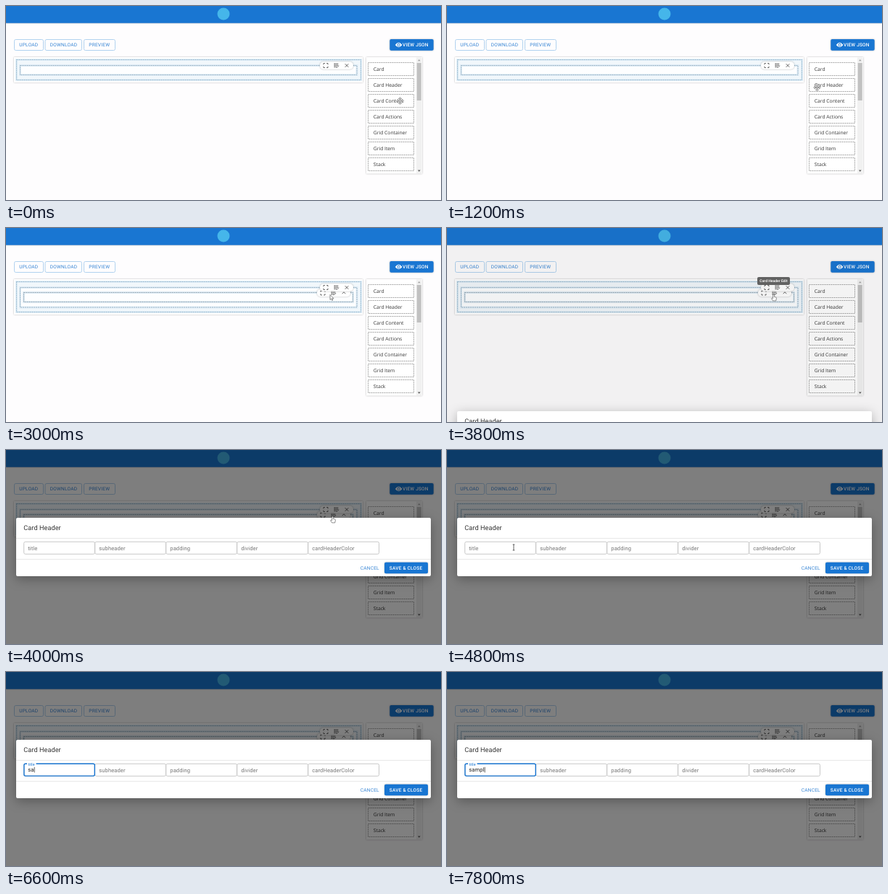
Animation of 600 by 269 pixels, one loop 8 s. Source, as an HTML page:

```html
<!DOCTYPE html>
<html lang="en">
<head>
<meta charset="utf-8">
<title>Card builder</title>
<style>
  html, body { margin: 0; width: 100%; height: 100%; overflow: hidden; background: #fefdfe; }
  svg { display: block; width: 100vw; height: 100vh; }
  text { font-family: Roboto, sans-serif; text-rendering: geometricPrecision; white-space: pre; }
  .btn { font-size: 6.55px; letter-spacing: .22px; }
  .btn.white { font-weight: 500; letter-spacing: .19px; }
  .item { font: 6.75px "Open Sans", "Noto Sans", sans-serif; fill: #363636; }
  .field { font-size: 7.6px; letter-spacing: .07px; fill: #777; }
  .blue { fill: #1976d2; }
  .btn.blue { fill: #3584d4; }
  .white { fill: #fff; }
  .dash { stroke-dasharray: 2 1; stroke-width: .8; }
  .shadow { filter: drop-shadow(0 .7px .8px rgba(0, 0, 0, .28)); }
  .deep { filter: drop-shadow(0 4px 8px rgba(0, 0, 0, .3)); }
</style>
</head>
<body>
<svg id="stage" viewBox="0 0 600 269" preserveAspectRatio="none"></svg>
<script>
const LOOP = 8000, STEP = 200;
const stage = document.getElementById('stage');
const $ = id => document.getElementById(id);

const rect = (x, y, w, h, attrs = '') =>
  `<rect x="${x}" y="${y}" width="${w}" height="${h}" ${attrs}/>`;
const text = (x, y, cls, str, attrs = '') =>
  `<text x="${x}" y="${y}" class="${cls}" ${attrs}>${str}</text>`;
const group = (id, body, attrs = '') => `<g id="${id}" ${attrs}>${body}</g>`;
const dashed = (x, y, w, h, color) =>
  rect(x, y, w, h, `class="dash" stroke="${color}" fill="none"`);

// Dashed drop area with a soft blue edge
const zone = (x, y, w, h, color, fill) =>
  rect(x, y, w, h, `fill="${fill}" stroke="#dfedf7" stroke-width="3"`) + dashed(x, y, w, h, color);

const outlined = (x, w, label) =>
  rect(x + .5, 46.5, w, 15, 'rx="2" fill="none" stroke="#a9cdee" stroke-width=".9"') +
  text(x + 7.3, 56.3, 'btn blue', label);

const filled = (x, y, w, h) => rect(x, y, w, h, 'rx="2" class="blue shadow"');

// Toolbar: expand, edit grid and close (or collapse) icons
function toolbar(x, y, last) {
  const corners = 'M-3-1.2V-3H-1.2M1.2-3H3V-1.2M3 1.2V3H1.2M-1.2 3H-3V1.2';
  let dots = '';
  for (let i = 0; i < 3; i++)
    for (let j = 0; j < 3 - (i > 1); j++) dots += rect(i * 2.1 - 3, j * 2.1 - 3, 1.4, 1.4);
  return `<g transform="translate(${x} ${y})">` +
    rect(-8, -5.2, 46, 10.4, 'rx="5" class="white shadow"') +
    `<g fill="none" stroke="#4a4a4a" stroke-width=".85">
      <path d="${corners}"/><path d="${last}" transform="translate(29 0)"/>
      <path d="M15 3.2L18 .2"/></g>
    <g fill="#5a5a5a" transform="translate(14.5 0)">${dots}</g></g>`;
}
const CLOSE = 'M-2.3-2.3L2.3 2.3M2.3-2.3L-2.3 2.3';
const CHEVRON = 'M-2.3 1.2L0-1.2L2.3 1.2';

const frame = (height, inner) =>
  rect(11, 71, 481, height, 'class="white shadow"') +
  zone(14.5, 74.5, 475, height - 7, '#8fb0c6', '#f1f7fb') +
  zone(19.5, 82.5, 464.5, inner, '#8ea6b6', '#fdfeff');

const idle = frame(35, 13) + toolbar(441, 82.5, CLOSE);

const dropZone = frame(46, 24) + rect(22, 85, 459, 18.5, 'fill="#b9d9f7"') +
  text(23.8, 96.8, 'item', 'Release to drop') + toolbar(441, 82.5, CLOSE);

const nested = frame(49, 27.5) + rect(24, 89, 455, 14, 'class="white shadow"') +
  zone(24.5, 89.5, 454, 13, '#8a979f', '#fdfeff') +
  toolbar(437, 90, CHEVRON) + toolbar(441, 82.5, CLOSE);

const names = ['Card', 'Card Header', 'Card Content', 'Card Actions', 'Grid Container', 'Grid Item', 'Stack'];
const list = names.map((name, i) => group('item' + i,
  dashed(499.5, 78.5 + i * 22, 63, 18, '#8f8f8f') + text(506.8, 90.1 + i * 22, 'item', name))).join('');

const side = rect(497, 71, 77, 161.5, 'class="white shadow"') + list +
  rect(566, 71.5, 7.5, 160.5, 'fill="#f1f1f1"') + rect(566.7, 79, 6, 52, 'fill="#c1c1c1"') +
  '<path d="M568 76.2h3.6l-1.8-2.2z" fill="#a3a3a3"/><path d="M568 227.6h3.6l-1.8 2.2z" fill="#505050"/>';

const header = rect(0, 0, 600, 23.7, 'class="blue shadow"') +
  '<circle cx="300" cy="11" r="8.5" fill="#45b6ea"/>';

const eye = `<g transform="translate(541.6 53.9)"><path class="white" d="M-4.8 0Q0-6.4 4.8 0Q0 6.4-4.8 0"/>
  <circle r="2.1" class="blue"/><circle r="1.25" class="white"/></g>`;

const page = header + outlined(11, 40, 'UPLOAD') + outlined(53.5, 50.5, 'DOWNLOAD') +
  outlined(107, 43, 'PREVIEW') + filled(529.3, 46, 60.4, 15.7) + eye +
  text(547, 56.3, 'btn white', 'VIEW JSON') +
  group('idle', idle) + group('drop', dropZone) + group('nested', nested) + side;

const tooltip = rect(428, 68, 45, 11, 'rx="2" fill="#666"') +
  text(450.5, 75.3, 'white', 'Card Header Edit', 'text-anchor="middle" font-size="5.05" font-weight="600"');

const fields = ['title', 'subheader', 'padding', 'divider', 'cardHeaderColor'];
const dialog = rect(14, 94, 572, 81, 'rx="2" class="white deep"') +
  text(24.3, 111.3, '', 'Card Header', 'font-size="9.15" letter-spacing=".07" fill="#333"') +
  '<path d="M14 122.5H586M14 151.5H586" stroke="#e2e2e2" stroke-width=".8"/>' +
  fields.map((name, i) =>
    rect(24.7 + i * 98, 127.3, 97.8, 17, 'rx="2" fill="none" stroke="#c2c2c2" stroke-width=".9"') +
    text(30.3 + i * 98, 138.6, 'field', name, `id="field${i}"`)).join('') +
  group('focus', rect(24.9, 127.3, 97.4, 16.8, 'rx="2" fill="none" stroke="#1976d2" stroke-width="1.4"') +
    rect(29, 126, 12.5, 3, 'class="white"') + text(30.4, 130, 'blue', 'title', 'font-size="5.5"') +
    text(30.3, 138.2, 'field', '', 'id="value" style="fill:#222"') +
    rect(0, 131.8, .7, 7.6, 'id="caret" fill="#222"')) +
  text(488.8, 165.8, 'btn blue', 'CANCEL') + filled(522, 155.7, 60, 15.5) +
  text(528.8, 165.8, 'btn white', 'SAVE &amp; CLOSE');

const cursors = {
  move: '<path d="M0-5.2L5.2 0L0 5.2L-5.2 0Z" fill="#fff" opacity=".8"/><path d="M0-5L1.9-3H.5V-.5H3V-1.9L5 0L3 1.9V.5H.5V3H1.9L0 5L-1.9 3H-.5V.5H-3V1.9L-5 0L-3-1.9V-.5H-.5V-3H-1.9Z" fill="#fff" stroke="#555" stroke-width=".6"/>',
  arrow: '<path d="M0 0V7L1.6 5.6L2.7 8L3.8 7.5L2.8 5.2H5Z" fill="#fff" stroke="#444" stroke-width=".6"/>',
  hand: '<path d="M-.9 5V.6Q-.9-.5 0-.5T.9.6V3L3.2 3.5Q4 3.8 3.9 4.8L3.2 8.4H-.9L-2.9 5.4Q-2.8 4.4-1.9 4.7Z" fill="#fff" stroke="#444" stroke-width=".6"/>',
  beam: '<path d="M-1.3-4H1.3M0-4V4M-1.3 4H1.3" fill="none" stroke="#222" stroke-width=".7"/>'
};

stage.innerHTML = rect(0, 0, 600, 269, 'fill="#fefdfe"') + page + group('tip', tooltip) +
  rect(0, 0, 600, 269, 'id="shade"') + group('dialog', dialog) +
  group('pointer', Object.entries(cursors).map(([id, d]) => group(id, d)).join(''));

// [time, cursor, x, y]
const track = [
  [0, 'move', 543.5, 131.5], [200, 'move', 536, 123], [400, 'move', 527, 115], [600, 'move', 522, 111],
  [1000, 'move', 515, 112], [1200, 'move', 510.5, 113], [2000, 'move', 466, 104], [2200, 'move', 428, 97],
  [2400, 'arrow', 426, 95], [3000, 'arrow', 447, 92.5], [3200, 'hand', 450.5, 92.5],
  [4200, 'arrow', 425, 99], [4400, 'arrow', 318, 115], [4600, 'arrow', 186, 129],
  [4800, 'beam', 92, 135], [5000, 'beam', 56, 136], [5200, 'beam', 44, 136], [5400, '', 0, 0]
];
const keys = [6400, 6600, 7000, 7400, 7800];
const WORD = 'sampl';

const show = (id, on) => { $(id).style.display = on ? '' : 'none'; };
const clamp = v => Math.max(0, Math.min(1, v));

function draw(t) {
  show('idle', t < 1800);
  show('drop', t >= 1800 && t < 2400);
  show('nested', t >= 2400);
  $('item1').setAttribute('opacity', t >= 1800 && t < 2400 ? .35 : 1);
  show('tip', t >= 3400 && t < 4000);

  const p = clamp((t - 3780) / 220);
  $('shade').setAttribute('opacity', p * .5);
  $('dialog').setAttribute('transform', `translate(0 ${176 * (1 - p)})`);
  show('dialog', p > 0);

  const focused = t >= 5200;
  show('focus', focused);
  show('field0', !focused);
  const value = $('value');
  value.textContent = WORD.slice(0, keys.filter(k => t >= k).length);
  $('caret').setAttribute('x', 30.6 + (value.textContent ? value.getComputedTextLength() : 0));
  show('caret', t >= keys[0] || (t - 5200) % 1060 < 530);

  const [, kind, x, y] = track.filter(s => s[0] <= t).pop();
  for (const id in cursors) show(id, id === kind);
  $('pointer').setAttribute('transform', `translate(${x} ${y})`);
}

const start = performance.now();
let shown = -1;
function tick() {
  const t = Math.floor((performance.now() - start) % LOOP / STEP) * STEP;
  if (t !== shown) draw(shown = t);
  requestAnimationFrame(tick);
}
tick();
</script>
</body>
</html>
```
